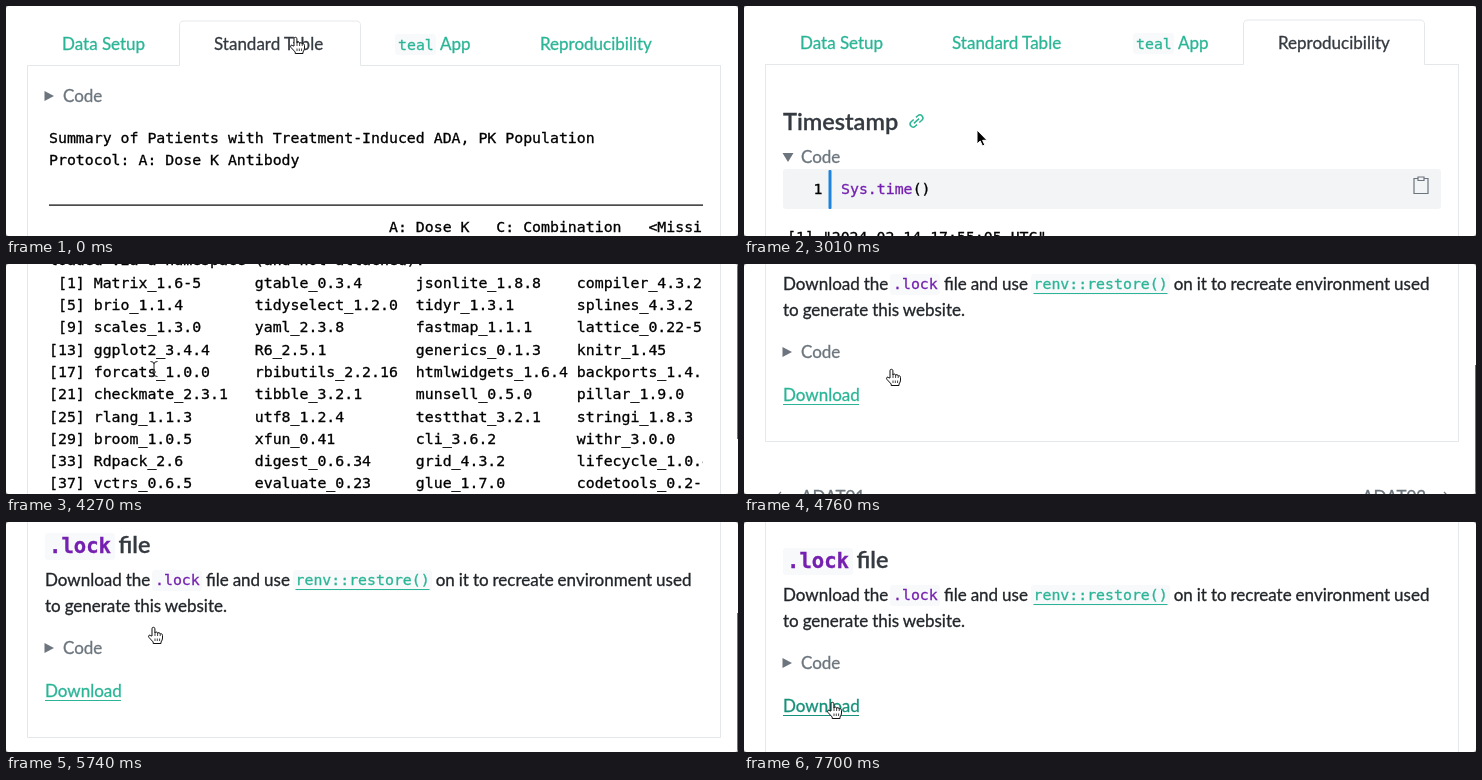
An HTML page for the animation above (8.05 s loop, 732 by 230 pixels).

```html
<!DOCTYPE html>
<html lang="en">
<head>
<meta charset="utf-8">
<title>Reproducibility tab</title>
<style>
html, body { margin: 0; width: 100%; height: 100%; overflow: hidden; background: #8c8c8c; }
svg { display: block; width: 732px; height: 230px; background: #fff; border-radius: 3px; }
text { font: 17px Lato, sans-serif; color: #212529; white-space: pre; stroke: currentColor; stroke-width: .3px; }
text, .link, .muted { fill: currentColor; }
.body { word-spacing: -.4px; }
.mono { font: 14.875px "DejaVu Sans Mono", monospace; color: #000; }
.link { color: #2bb596; }
.link.hover { color: #16917a; }
.active { color: #343a40; }
.muted { color: #6c757d; }
.purple { color: #7520b0; }
.head { font-size: 23.5px; font-weight: 600; color: #343a40; }
.headcode { font-size: 20.6px; font-weight: 600; }
.chip { fill: #f7f9fa; }
.line { fill: none; stroke: #e4e8ea; }
.icon { fill: none; stroke: #6c757d; stroke-width: 1.2; }
</style>
</head>
<body>
<svg>
  <defs><clipPath id="code"><rect x="39" y="60" width="657.5" height="1600"/></clipPath></defs>
  <g id="page"></g>
  <rect id="bar" x="731" width="1" height="183" fill="#707070"/>
  <g id="cursor" stroke-linejoin="round">
    <path id="arrow" d="M0 0V14L3.2 11L5.5 16L7.8 15L5.6 10.3H10Z" stroke="#fff"/>
    <g id="beam" fill="none">
      <path d="M-3.5-7.5Q0-7.5 0-5V5Q0 7.5-3.5 7.5M3.5-7.5Q0-7.5 0-5M0 5Q0 7.5 3.5 7.5M-2 3H2" stroke="#222"/>
    </g>
    <g id="hand" stroke="#111">
      <path d="M-2 9V1.7Q-2 .3-.6 .3T.9 1.7V6Q1 5 2.3 5T3.6 6.5Q3.8 5.5 5 5.7T6.2 7.2Q6.5 6.5 7.5 6.8T8.5 8.5V11Q8.5 13 7 15V16.5H-.8V15L-5 10.5Q-6 9-5 8.3T-3.2 8.8Z" fill="#fff"/>
      <path d="M1 6V9M3.6 6.5V9M6.2 7.2V9M1 11.5V14M3.3 11.5V14M5.6 11.5V14" stroke-width=".8"/>
    </g>
  </g>
</svg>
<script>
const LOOP = 8050, STEP = 70, ROW = 22.3125, SWITCH = 1820;
const $ = id => document.getElementById(id);
const escape = s => s.replace(/</g, "&lt;");
const text = (x, y, s, cls = "", id = "") =>
  `<text x="${x}" y="${y}" class="${cls}" id="${id}">${escape(s)}</text>`;
const rect = (x, y, w, h, attrs) => `<rect x="${x}" y="${y}" width="${w}" height="${h}" ${attrs}/>`;
const lines = (y, rows) => `<g clip-path="url(#code)">` +
  rows.map((s, i) => s && text(43, y + i * ROW, s, "mono")).join("") + "</g>";
const fold = (y, open) => text(57, y, "Code", "muted") +
  `<path class="muted" d="${open ? `M38.5 ${y - 10}h11l-5.5 9z` : `M38.5 ${y - 11}v10l9.5-5z`}"/>`;
const tabShape = (x, id) =>
  `<path id="${id}" class="line" fill="none" d="M21 59.5H${x}V19.5q0-4.5 4.5-4.5h172q4.5 0 4.5 4.5V59.5H715"/>`;

// Heading, open fold, one line of code with its copy button.
function section(y, title, iconX, call) {
  const b = y + 39;
  return text(39, y, title, "head") +
    `<g transform="translate(${iconX} ${y - 9}) rotate(-42)" fill="none" stroke="#2bb596" stroke-width="1.5">
      <path d="M-1-3h-3.5a3 3 0 0 0 0 6h2.5M1 3h3.5a3 3 0 0 0 0-6h-2.5M-3.5 0h7"/></g>` +
    fold(y + 33, true) +
    rect(39, b, 658, 40, 'rx="3" fill="#f3f4f6"') + rect(84.5, b + 1, 3, 39, 'rx="1" fill="#1f83dc"') +
    text(69.5, y + 64, "1", "mono") + text(97, y + 64, call, "mono purple") +
    text(97 + call.length * 8.955, y + 64, "()", "mono") +
    `<path class="icon" d="M674 ${b + 9.5}h-4v15h14v-15h-4M674 ${b + 8}h6v3.5h-6z"/>`;
}

const packages = `Matrix_1.6-5 gtable_0.3.4 jsonlite_1.8.8 compiler_4.3.2
brio_1.1.4 tidyselect_1.2.0 tidyr_1.3.1 splines_4.3.2
scales_1.3.0 yaml_2.3.8 fastmap_1.1.1 lattice_0.22-5
ggplot2_3.4.4 R6_2.5.1 generics_0.1.3 knitr_1.45
forcats_1.0.0 rbibutils_2.2.16 htmlwidgets_1.6.4 backports_1.4.1
checkmate_2.3.1 tibble_3.2.1 munsell_0.5.0 pillar_1.9.0
rlang_1.1.3 utf8_1.2.4 testthat_3.2.1 stringi_1.8.3
broom_1.0.5 xfun_0.41 cli_3.6.2 withr_3.0.0
Rdpack_2.6 digest_0.6.34 grid_4.3.2 lifecycle_1.0.4
vctrs_0.6.5 evaluate_0.23 glue_1.7.0 codetools_0.2-19
fansi_1.0.6 survival_3.5-7 colorspace_2.1-0 purrr_1.0.2
rmarkdown_2.25 tools_4.3.2 pkgconfig_2.0.3 htmltools_0.5.7
stringr_1.5.1 rstudioapi_0.15.0 emmeans_1.10.0 mvtnorm_1.2-4
estimability_1.4.1 xtable_1.8-4 nestcolor_0.1.2 coda_0.19-4
TH.data_1.1-2 MASS_7.3-60 zoo_1.8-12 sandwich_3.1-0`.split("\n").map((row, i) =>
  `[${i * 4 + 1}] `.padStart(5) + row.split(" ").map(p => p.padEnd(18)).join(""));

const session = `R version 4.3.2 (2023-10-31)
Platform: x86_64-pc-linux-gnu (64-bit)
Running under: Ubuntu 22.04.3 LTS

Matrix products: default
BLAS:   /usr/lib/x86_64-linux-gnu/openblas-pthread/libblas.so.3
LAPACK: /usr/lib/x86_64-linux-gnu/openblas-pthread/libopenblasp-r0.3.20.so

locale:
 [1] LC_CTYPE=en_US.UTF-8       LC_NUMERIC=C
 [3] LC_TIME=en_US.UTF-8        LC_COLLATE=en_US.UTF-8
 [5] LC_MONETARY=en_US.UTF-8    LC_MESSAGES=en_US.UTF-8
 [7] LC_PAPER=en_US.UTF-8       LC_NAME=C
 [9] LC_ADDRESS=C               LC_TELEPHONE=C
[11] LC_MEASUREMENT=en_US.UTF-8 LC_IDENTIFICATION=C

time zone: Etc/UTC
tzcode source: system (glibc)

attached base packages:
[1] stats     graphics  grDevices utils     datasets  methods   base

other attached packages:
[1] tern_0.9.3       rtables_0.6.6    formatters_0.5.5 magrittr_2.0.3
[5] dplyr_1.1.4

loaded via a namespace (and not attached):`.split("\n").concat(packages);

$("page").innerHTML =
  `<path class="line" d="M21.5 59.5V1582.5H714.5V59.5"/>` +
  tabShape(173.5, "tabA") + tabShape(499.5, "tabB") +
  text(56, 44, "Data Setup", "link") + text(208, 44, "Standard Table", "link", "standard") +
  rect(389, 28, 41, 21, 'rx="3" class="chip"') + text(392, 44, "teal", "mono link") +
  text(434, 44, "App", "link") + text(534, 44, "Reproducibility", "link", "repro") +
  `<g id="table">` + fold(96, false) +
  lines(137, ["Summary of Patients with Treatment-Induced ADA, PK Population",
    "Protocol: A: Dose K Antibody", "", "", " ".repeat(38) + "A: Dose K   C: Combination   <Missing>"]) +
  rect(43, 198.5, 654, 1.2, "") + "</g>" +
  `<g id="report">` + section(125, "Timestamp", 172.5, "Sys.time") +
  lines(237, ['[1] "2024-02-14 17:55:05 UTC"']) +
  section(311, "Session Info", 188, "sessionInfo") + lines(422.2, session) +
  rect(39, 1378, 70, 27, 'rx="3" class="chip"') + text(43, 1397.6, ".lock", "mono purple headcode") +
  text(112.5, 1397.6, "file", "head") +
  text(39, 1431, "Download the", "body") + rect(146, 1415, 50, 21, 'rx="3" class="chip"') +
  text(149, 1430, ".lock", "mono purple") + text(200, 1431, "file and use", "body") +
  rect(287, 1415, 139, 21, 'rx="3" class="chip"') + text(289.5, 1430, "renv::restore()", "mono link") +
  rect(289.5, 1434, 134, 1, 'class="link"') +
  text(429.7, 1431, "on it to recreate environment used", "body") +
  text(39, 1457, "to generate this website.", "body") + fold(1499, false) +
  `<g id="download">` + text(39, 1542, "Download", "link") + rect(39, 1545, 76, 1, 'class="link"') + "</g>" +
  `<path class="icon" d="M45 1638H32m5-5l-5 5 5 5M692 1638h13m-5-5l5 5-5 5"/>` +
  text(57, 1644, "ADAT01", "muted") + text(618, 1644, "ADAT02", "muted") + "</g>";

const scrollKeys = [[2940, 0], [3010, 1], [3080, 60], [3150, 180], [3220, 280], [3290, 350], [3500, 468],
  [3570, 468], [3640, 474], [3780, 640], [3990, 850], [4200, 950], [4270, 1001], [4340, 1150], [4410, 1270],
  [4480, 1360], [4760, 1405], [5180, 1440], [5250, 1440], [5320, 1434], [5460, 1402], [5600, 1380],
  [5740, 1367], [6020, 1352]];
const cursorKeys = [[0, 290, 31], [70, 290, 35], [490, 290, 35], [1330, 555, 36], [1470, 571, 38],
  [2240, 571, 38], [2590, 143, 172], [2870, 233, 124], [3010, 233, 124], [3220, 148, 105],
  [6160, 148, 105], [6860, 89, 180]];

const clamp = v => Math.min(1, Math.max(0, v));
const smooth = v => v * v * (3 - 2 * v);
function at(keys, t, ease = v => v) {
  const i = keys.findIndex(k => k[0] > t);
  if (i < 0) return keys.at(-1).slice(1);
  if (i === 0) return keys[0].slice(1);
  const [a, b] = [keys[i - 1], keys[i]], p = ease((t - a[0]) / (b[0] - a[0]));
  return a.slice(1).map((v, k) => v + (b[k + 1] - v) * p);
}
const show = (id, on) => $(id).style.display = on ? "" : "none";

function draw(now) {
  const t = Math.floor(now % LOOP / STEP) * STEP;
  const [scroll] = at(scrollKeys, t), [x, y] = at(cursorKeys, t, smooth);
  const switched = t >= SWITCH;
  $("page").setAttribute("transform", `translate(0 ${-Math.round(scroll)})`);

  show("tabA", !switched);
  show("tabB", switched);
  $("standard").setAttribute("class", switched ? "link" : "active");
  $("repro").setAttribute("class", switched ? "active" : x > 499 ? "link hover" : "link");
  const out = clamp((t + STEP - SWITCH) / 150), into = clamp((t + STEP - SWITCH - 150) / 150);
  $("table").setAttribute("opacity", 1 - out);
  show("table", out < 1);
  $("report").setAttribute("opacity", into);
  show("report", into > 0);
  const over = t > 6160 && x < 115;
  $("download").querySelectorAll(".link").forEach(e => e.classList.toggle("hover", over));

  $("bar").setAttribute("y", Math.round(175 + .27 * (scroll - 1001) - 183));
  $("bar").setAttribute("opacity", t < 3010 ? 0 : 1 - clamp((t - 6440) / 280));
  const kind = t < 2310 || t >= 4550 ? "hand" : t < 3220 ? "arrow" : "beam";
  for (const id of ["hand", "arrow", "beam"]) show(id, id === kind);
  $("cursor").setAttribute("transform", `translate(${x} ${y})`);
}
const start = performance.now();
(function tick() {
  draw(performance.now() - start);
  requestAnimationFrame(tick);
})();
</script>
</body>
</html>
```
